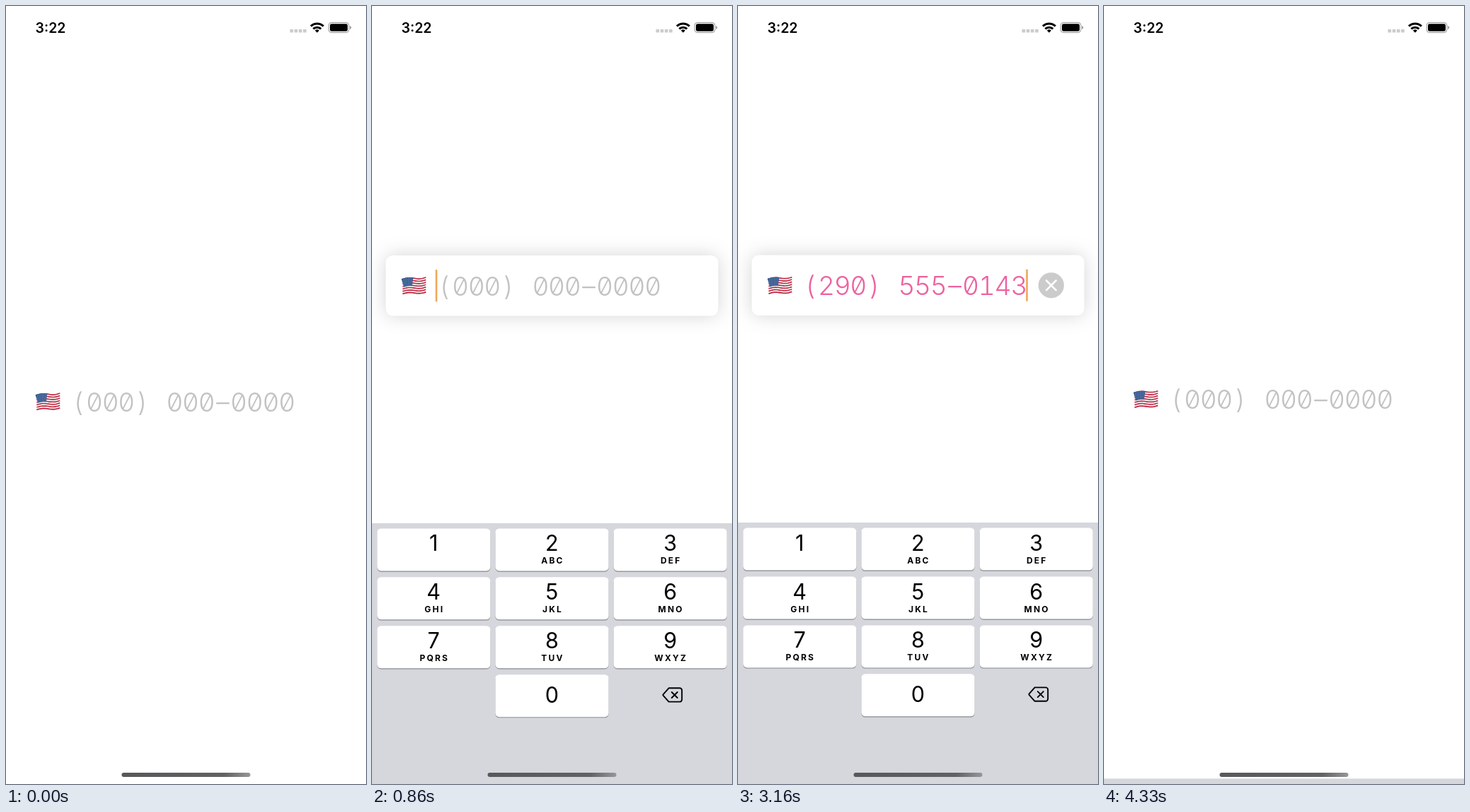
Animation of 509 by 1101 pixels, one loop 4400 ms. Source, as an HTML page:

```html
<!DOCTYPE html>
<html lang="en">
<head>
<meta charset="utf-8">
<title>Phone number field</title>
<style>
  html, body { margin: 0; width: 100%; height: 100%; overflow: hidden; background: #fff; }
  svg { display: block; width: 509px; height: 1101px; }
  text { font-family: Inter, Roboto, sans-serif; }
  #number { font-size: 37.2px; font-weight: 300; font-feature-settings: "zero", "tnum"; text-anchor: middle; }
  #card { filter: drop-shadow(0 0 13px rgba(0, 0, 0, .17)); }
  .digit { font-size: 30.5px; text-anchor: middle; }
  .letters { font-size: 12px; font-weight: 700; letter-spacing: 2.2px; text-anchor: middle; }
</style>
</head>
<body>
<svg viewBox="0 0 509 1101">
  <defs>
    <linearGradient id="bar">
      <stop offset="0" stop-color="#58585a"/>
      <stop offset=".8" stop-color="#626264"/>
      <stop offset="1" stop-color="#97979a"/>
    </linearGradient>
  </defs>

  <g id="status">
    <text x="41.6" y="37.6" font-size="19.5" font-weight="600">3:22</text>
    <path d="M401.5 35.3H425" stroke="#cbcbcd" stroke-width="4.6" stroke-dasharray="4.6 1.6"/>
    <g fill="none" stroke="#000" stroke-width="3">
      <path d="M431 28.6a12.6 12.6 0 0 1 17.8 0"/>
      <path d="M434.4 32.4a7.8 7.8 0 0 1 11 0"/>
    </g>
    <path d="M436.9 34.8a4.3 4.3 0 0 1 6 0l-3 3z"/>
    <rect x="456.2" y="23.4" width="28.6" height="14.2" rx="4" fill="none" stroke="#8e8e8e"/>
    <rect x="458" y="25.2" width="25" height="10.6" rx="2.4"/>
    <path d="M486.3 28v5a2.6 2.6 0 0 0 0-5" fill="#8e8e8e"/>
  </g>

  <g id="field">
    <rect id="card" x="19.5" y="-42.7" width="470" height="85.4" rx="10" fill="#fff"/>
    <g id="flag" fill="none"></g>
    <text id="number" y="14"></text>
    <rect id="cursor" y="-22.7" width="2.6" height="45.4" rx="1.2" fill="#f3a658"/>
    <g id="clear">
      <circle cx="442.8" r="18.1" fill="#cbcbcb"/>
      <path d="M436-6.8l13.6 13.6m0-13.6L436 6.8" stroke="#fff" stroke-width="2.6" stroke-linecap="round"/>
    </g>
  </g>

  <g id="keyboard">
    <rect width="509" height="372" fill="#d5d7dd"/>
    <g id="keys"></g>
    <g fill="none" stroke="#000" stroke-width="1.9" stroke-linejoin="round" stroke-linecap="round">
      <path d="M419.6 233.4H435a3.2 3.2 0 0 1 3.2 3.2v13a3.2 3.2 0 0 1-3.2 3.2H419.6L411.6 243.8q-.5-.7 0-1.4z"/>
      <path d="M423.8 239.1l8 8m0-8l-8 8"/>
    </g>
  </g>
  <rect x="163.5" y="1085" width="182" height="6" rx="3" fill="url(#bar)"/>
</svg>

<script>
const LOOP = 4400, LEFT = 91, ADVANCE = 22.68, DIGITS = '2905550143';
const TYPED = [1240, 1440, 1670, 1990, 2130, 2270, 2400, 2620, 2970, 3120];
const FOCUS = 260, CLEAR = 3790, BLUR = 4000;
const $ = id => document.getElementById(id);
const show = (id, on) => $(id).setAttribute('opacity', +on);
const move = (id, y) => $(id).setAttribute('transform', `translate(0 ${y.toFixed(2)})`);

function drawKeys() {
  const letters = ['', 'ABC', 'DEF', 'GHI', 'JKL', 'MNO', 'PQRS', 'TUV', 'WXYZ'];
  const key = (col, row, digit, sub) => {
    const x = 7.2 + col * 167.2, y = 7.6 + row * 68.9, mid = x + 80;
    const box = (dy, fill) =>
      `<rect x="${x}" y="${y + dy}" width="160.2" height="60" rx="5.5" fill="${fill}"/>`;
    return box(1.2, '#898a8e') + box(0, '#fff') +
      `<text class="digit" x="${mid}" y="${y + (digit ? 32 : 39.7)}">${digit}</text>` +
      `<text class="letters" x="${mid + 1.1}" y="${y + 50}">${sub}</text>`;
  };
  $('keys').innerHTML =
    letters.map((s, i) => key(i % 3, Math.floor(i / 3), i + 1, s)).join('') + key(1, 3, 0, '');
}

function drawFlag() {
  const band = 1.72;
  const wave = (row, from, to, attrs) => {
    const points = Array.from({length: 21}, (_, i) => {
      const u = from + (to - from) * i / 20;
      const y = -8.9 - 2.6 * u - 1.2 * Math.sin(u * 2 * Math.PI) + row * band;
      return `${(43.3 + 33 * u).toFixed(2)},${y.toFixed(2)}`;
    });
    return `<polyline points="${points.join(' ')}" ${attrs}/>`;
  };
  let art = '';
  for (let i = 0; i < 13; i++)
    art += wave(i, 0, 1, `stroke="${i % 2 ? '#f1eef0' : '#bd2840'}" stroke-width="1.8"`);
  art += wave(3, 0, .43, `stroke="#34588f" stroke-width="${7 * band}"`);
  for (let i = 0; i < 5; i++)
    art += wave(.5 + i * 1.25, .03, .41, 'stroke="#c3d0e4" stroke-width=".8" stroke-dasharray=".8 1.5"');
  $('flag').innerHTML = art;
}

// Groups the digits the way a phone field does while typing.
function format(d) {
  if (d.length < 4) return d;
  if (d.length < 8) return d.slice(0, 3) + '–' + d.slice(3);
  return `(${d.slice(0, 3)}) ${d.slice(3, 6)}–${d.slice(6)}`;
}

// Sets the text on a fixed grid, one character per cell.
function setNumber(text, fill) {
  const cells = [...text].map((_, i) => (LEFT + (i + .5) * ADVANCE).toFixed(2));
  $('number').textContent = text;
  $('number').setAttribute('x', cells.join(' '));
  $('number').setAttribute('fill', fill);
}

// Critically damped spring from 0 to 1.
function spring(ms, rate) {
  const x = Math.max(0, ms) / 1000 * rate;
  return 1 - (1 + x) * Math.exp(-x);
}

function draw(t) {
  const lift = t < BLUR ? spring(t - 373, 17) : 1 - spring(t - 4026, 19);
  move('field', 559.7 - 164.4 * lift);
  move('keyboard', 1101 - 370 * lift);

  const count = t < CLEAR ? TYPED.filter(at => at <= t).length : 0;
  const typed = format(DIGITS.slice(0, count));
  if (typed) setNumber(typed, '#ee62a0');
  else setNumber('(000) 000–0000', '#c2c2c2');

  const editing = t >= FOCUS && t < BLUR;
  const fade = t >= 3650 && t < CLEAR ? 1 - (t - 3600) / 240 : 1;
  show('card', editing);
  show('cursor', editing ? fade : 0);
  show('clear', count > 0);
  $('cursor').setAttribute('x', LEFT - 1.3 + typed.length * ADVANCE);
}

drawKeys();
drawFlag();
const start = performance.now();
function tick() {
  draw((performance.now() - start) % LOOP);
  requestAnimationFrame(tick);
}
draw(0);
requestAnimationFrame(tick);
</script>
</body>
</html>
```
